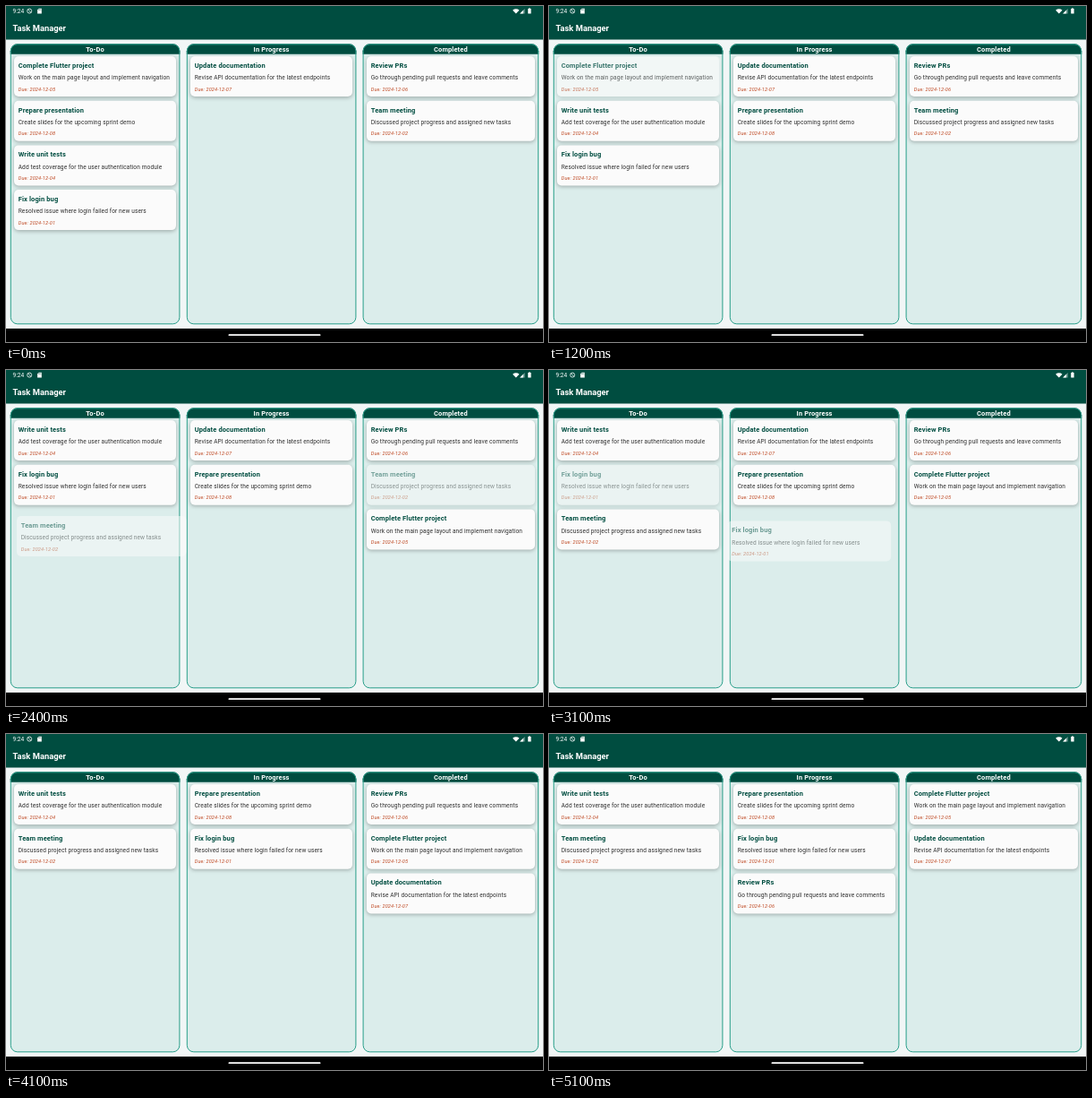
An HTML page with a canvas that plays this animation: 600x375 px, repeating every 5.5 s.

```html
<!DOCTYPE html>
<html lang="en">
<head>
<meta charset="utf-8">
<title>Task Manager</title>
<style>
html, body { margin: 0; width: 100%; height: 100%; overflow: hidden; background: #000; }
canvas { display: block; }
</style>
</head>
<body>
<canvas id="stage" width="600" height="375"></canvas>
<script>
const LOOP = 5500, STEP = 100;
const GREEN = '#004d40', TEAL = '#2b9f8b';
const ROW_TOP = 56, ROW_PITCH = 49.7, CARD_HEIGHT = 45;

const canvas = document.getElementById('stage');
const screen = canvas.getContext('2d');
const layer = document.createElement('canvas');
layer.width = canvas.width;
layer.height = canvas.height;
const layerCtx = layer.getContext('2d');

const columns = [
  { title: 'To-Do', x: 4.8, w: 189.6, cardX: 9, cardW: 181 },
  { title: 'In Progress', x: 201.8, w: 189.6, cardX: 206, cardW: 181 },
  { title: 'Completed', x: 398.6, w: 196.6, cardX: 403, cardW: 188 }
];

const tasks = {
  flutter: ['Complete Flutter project', 'Work on the main page layout and implement navigation', '05'],
  slides: ['Prepare presentation', 'Create slides for the upcoming sprint demo', '08'],
  tests: ['Write unit tests', 'Add test coverage for the user authentication module', '04'],
  login: ['Fix login bug', 'Resolved issue where login failed for new users', '01'],
  docs: ['Update documentation', 'Revise API documentation for the latest endpoints', '07'],
  review: ['Review PRs', 'Go through pending pull requests and leave comments', '06'],
  meeting: ['Team meeting', 'Discussed project progress and assigned new tasks', '02']
};

const startBoard = [['flutter', 'slides', 'tests', 'login'], ['docs'], ['review', 'meeting']];

// Path entries are [time, dx, dy] relative to the card's resting place.
const drags = [
  { id: 'slides', to: 1, drop: 1000, path: [[400, 0, 0], [700, 85.5, 12.2], [900, 190, 44]] },
  { id: 'flutter', to: 2, drop: 1700, path: [[1200, 0, 0], [1600, 425.2, 129.3]] },
  { id: 'meeting', to: 0, drop: 2500, path: [[2000, 0, 0], [2400, -391, 57.2]] },
  { id: 'login', to: 1, drop: 3200, path: [[2800, 0, 0], [3100, 190.6, 62.7]] },
  { id: 'docs', to: 2, drop: 4000, path: [[3500, 0, 0], [3900, 203, 76]] },
  { id: 'review', to: 1, drop: 4800, path: [[4400, 0, 0], [4700, -193, 94]] }
];

function text(ctx, str, x, y, font, color, spacing = 0.117, align = 'left') {
  ctx.font = font + ' Roboto, sans-serif';
  ctx.letterSpacing = spacing + 'px';
  ctx.textAlign = align;
  ctx.fillStyle = color;
  ctx.fillText(str, x, y);
}

function box(ctx, x, y, w, h, radius, color) {
  ctx.beginPath();
  ctx.roundRect(x, y, w, h, radius);
  ctx.fillStyle = color;
  ctx.fill();
}

function shape(points, color) {
  screen.beginPath();
  points.forEach(([x, y]) => screen.lineTo(x, y));
  screen.closePath();
  screen.fillStyle = color;
  screen.fill();
}

function card(ctx, id, x, y, w, shadow) {
  const [title, detail, day] = tasks[id];
  ctx.save();
  if (shadow) {
    ctx.shadowColor = 'rgba(0,0,0,0.27)';
    ctx.shadowBlur = 4;
    ctx.shadowOffsetY = 1.4;
  }
  box(ctx, x, y, w, CARD_HEIGHT, 5, '#fbfbfb');
  ctx.restore();
  text(ctx, title, x + 4.7, y + 12.8, 'bold 7.5px', GREEN);
  text(ctx, detail, x + 4.7, y + 26.2, '6.5625px', '#303030');
  text(ctx, 'Due: 2024-12-' + day, x + 4.7, y + 38.6, 'italic 5.625px', '#bf4a24');
}

function fadedCard(alpha, ...args) {
  layerCtx.clearRect(0, 0, layer.width, layer.height);
  card(layerCtx, ...args);
  screen.globalAlpha = alpha;
  screen.drawImage(layer, 0, 0);
  screen.globalAlpha = 1;
}

function statusIcons() {
  screen.strokeStyle = '#fff';
  screen.lineWidth = 0.8;
  screen.beginPath();
  screen.arc(26.2, 5.6, 2.5, 0, Math.PI * 2);
  screen.moveTo(24.5, 3.9);
  screen.lineTo(27.9, 7.3);
  screen.stroke();
  shape([[36.7, 2.7], [39.8, 2.7], [39.8, 8.4], [35.1, 8.4], [35.1, 4.3]], '#fff');
  for (const x of [36.7, 37.8, 38.9]) box(screen, x - 0.25, 3.5, 0.5, 1.2, 0, GREEN);

  screen.beginPath();
  screen.moveTo(569.8, 8.6);
  screen.arc(569.8, 8.6, 5.4, -Math.PI * 0.74, -Math.PI * 0.26);
  screen.fillStyle = '#fff';
  screen.fill();
  shape([[574.2, 8.4], [579.6, 3], [579.6, 8.4]], 'rgba(255,255,255,0.45)');
  shape([[574.2, 8.4], [577.8, 4.8], [577.8, 8.4]], '#fff');
  box(screen, 583.2, 3, 3.4, 5.6, 0.5, '#fff');
  box(screen, 584.2, 2.3, 1.4, 1, 0, '#fff');
}

function chrome() {
  box(screen, 0, 0, 600, 375, 0, '#f1f6f6');
  box(screen, 0, 0, 600, 37.5, 0, GREEN);
  text(screen, '9:24', 7.5, 8, '6.6px', '#fff', 0);
  statusIcons();
  text(screen, 'Task Manager', 7.5, 28, 'bold 9.375px', '#fff', 0);
  box(screen, 0, 360, 600, 15, 0, '#000');
  box(screen, 248.5, 366.2, 103, 1.9, 1, '#fff');

  for (const { title, x, w } of columns) {
    box(screen, x, 42.3, w, 313, 8, '#dbedeb');
    box(screen, x, 42.3, w, 11.4, [8, 8, 0, 0], GREEN);
    screen.beginPath();
    screen.roundRect(x + 0.5, 42.8, w - 1, 312, 7.5);
    screen.strokeStyle = TEAL;
    screen.lineWidth = 1;
    screen.stroke();
    text(screen, title, x + w / 2, 50.8, 'bold 7.5px', '#fff', 0.117, 'center');
  }
}

function boardAt(time) {
  const board = startBoard.map(list => [...list]);
  for (const { id, to, drop } of drags) {
    if (time < drop) break;
    const list = board.find(ids => ids.includes(id));
    list.splice(list.indexOf(id), 1);
    board[to].push(id);
  }
  return board;
}

function offsetAt(path, time) {
  const next = path.findIndex(([t]) => t > time);
  if (next < 0) return path[path.length - 1].slice(1);
  const [t0, x0, y0] = path[next - 1], [t1, x1, y1] = path[next];
  const p = (time - t0) / (t1 - t0);
  return [x0 + (x1 - x0) * p, y0 + (y1 - y0) * p];
}

function draw(time) {
  chrome();
  const drag = drags.find(d => time >= d.path[0][0] && time < d.drop);
  let held;
  boardAt(time).forEach((ids, c) => ids.forEach((id, row) => {
    const { cardX, cardW } = columns[c];
    const y = ROW_TOP + row * ROW_PITCH;
    if (drag && drag.id === id) {
      fadedCard(0.47, id, cardX, y, cardW, true);
      held = [cardX, y, cardW];
    } else {
      card(screen, id, cardX, y, cardW, true);
    }
  }));
  if (held) {
    const [x, y, w] = held, [dx, dy] = offsetAt(drag.path, time);
    fadedCard(0.5, drag.id, x + dx, y + dy, w + 1.5, false);
  }
}

const begin = performance.now();
function tick() {
  const time = (performance.now() - begin) % LOOP;
  draw(Math.floor(time / STEP) * STEP);
  requestAnimationFrame(tick);
}
tick();
</script>
</body>
</html>
```
